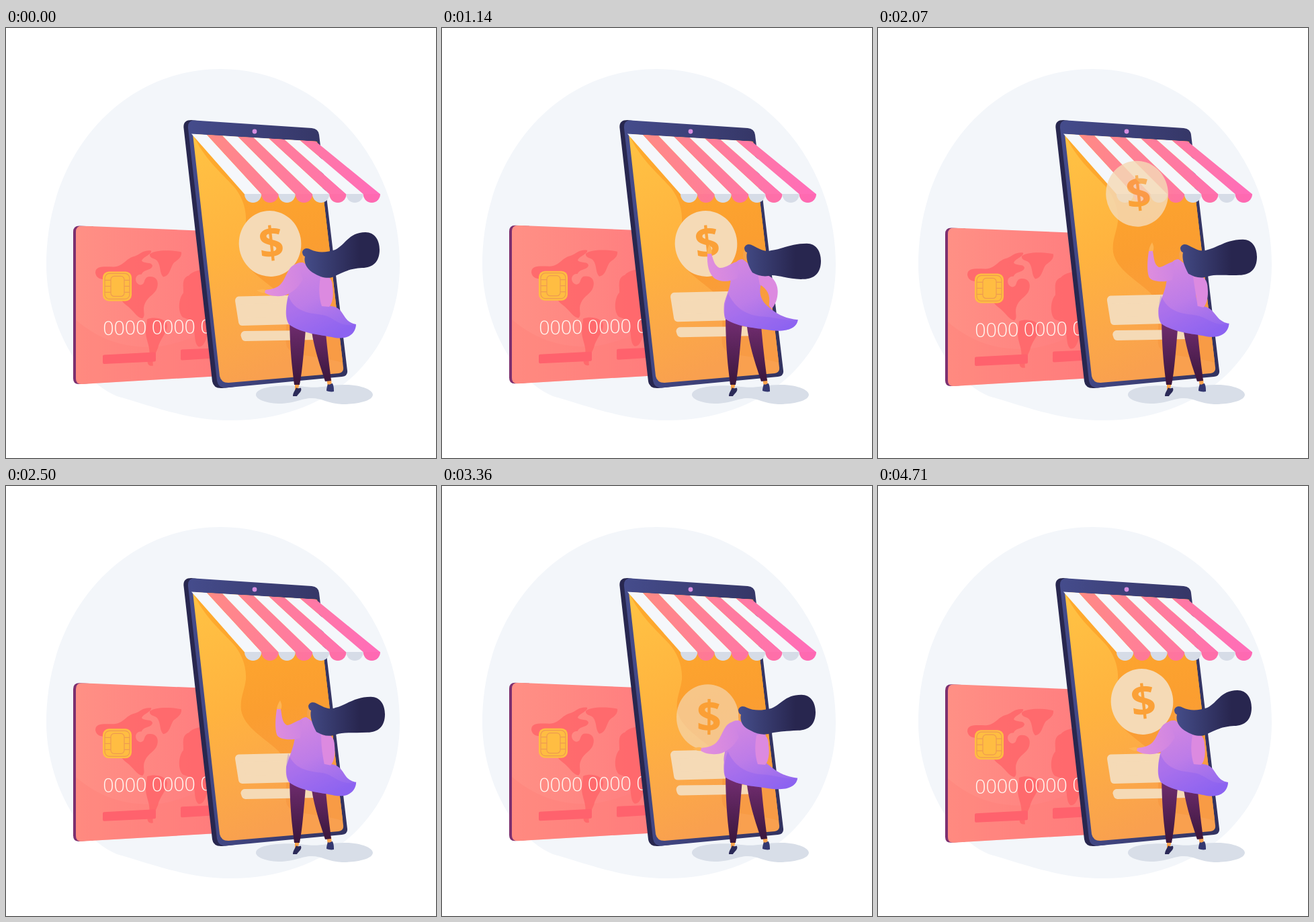
Animation, 640 px wide and 640 px high, one loop 4.78 s. Source, as an HTML page:

```html
<!DOCTYPE html>
<html lang="en">
<head>
<meta charset="utf-8">
<title>Mobile shopping</title>
<style>
  html, body { margin: 0; height: 100%; overflow: hidden; background: #fff; }
  svg { display: block; width: 100vw; height: 100vh; }
  text { font-family: "Open Sans", sans-serif; }
</style>
</head>
<body>
<svg viewBox="0 0 640 640">
  <defs>
    <linearGradient id="cardFill"><stop stop-color="#ff9085"/><stop offset="1" stop-color="#ff7d7f"/></linearGradient>
    <linearGradient id="frameFill"><stop stop-color="#454c8c"/><stop offset="1" stop-color="#32325f"/></linearGradient>
    <linearGradient id="screenFill" x2=".3" y2="1"><stop stop-color="#ffc444"/><stop offset=".5" stop-color="#ffb33f"/><stop offset="1" stop-color="#f9a04f"/></linearGradient>
    <linearGradient id="waveFill" x2=".2" y2="1"><stop stop-color="#ffad2c"/><stop offset=".6" stop-color="#fb9e30"/><stop offset="1" stop-color="#f89b45"/></linearGradient>
    <linearGradient id="stripeFill" gradientUnits="userSpaceOnUse" x1="300" x2="557"><stop stop-color="#ff8a84"/><stop offset="1" stop-color="#ff6cba"/></linearGradient>
    <linearGradient id="hairFill" gradientUnits="userSpaceOnUse" x1="445" x2="535"><stop stop-color="#444c88"/><stop offset=".9" stop-color="#28264f"/></linearGradient>
    <linearGradient id="dressFill" gradientUnits="userSpaceOnUse" x1="435" y1="345" x2="490" y2="460"><stop stop-color="#d588e0"/><stop offset=".5" stop-color="#bd7ce8"/><stop offset="1" stop-color="#9068f0"/></linearGradient>
    <linearGradient id="armFill" gradientUnits="userSpaceOnUse" x1="390" x2="445"><stop stop-color="#e28fdc"/><stop offset="1" stop-color="#cd84e3"/></linearGradient>
    <linearGradient id="legFill" x2="0" y2="1"><stop stop-color="#7a3078"/><stop offset="1" stop-color="#3a173c"/></linearGradient>
    <clipPath id="cardClip"><path d="M104 303Q104 294 113 294L310 302V518L113 529.500Q104 530 104 521Z"/></clipPath>
    <clipPath id="screenClip"><path d="M278 158L463 169 502 505Q503 513 495 514L331 528Q320 528 318 518Z"/></clipPath>
  </defs>

  <path fill="#f3f6fa" d="M320 61C466 61 586 192 586 352C586 490 480 584 335 584C270 584 215 562 165 548C100 520 60 430 60 352C60 186 174 61 320 61Z"/>
  <path fill="#d8dee8" d="M372 546C372 532 420 530 445 534C470 537 480 530 510 531C535 533 546 540 546 546C545 556 520 560 500 560C480 559 470 551 455 551C440 551 430 559 405 559C385 558 372 552 372 546Z"/>

  <g id="card">
    <path fill="#7c3070" d="M100 303Q100 294 109 294L130 295V528L109 529.500Q100 530 100 521Z"/>
    <g clip-path="url(#cardClip)">
      <path fill="url(#cardFill)" d="M104 290H310V532H104Z"/>
      <path fill="#ff7c74" opacity=".3" d="M104 434C140 465 180 477 225 474C260 470 285 455 310 450V532H104Z"/>
      <g fill="#ff666a" opacity=".85">
        <path d="M133 364C133 353 146 355 160 355C176 354 178 342 192 339C201 336 203 330 216 331C218 336 204 340 202 346C206 351 216 347 218 353C217 361 205 358 202 366C190 366 191 380 200 382C208 381 204 373 211 370C223 368 228 376 225 386C222 396 212 398 207 409C202 419 209 427 203 432C194 430 190 420 179 412C166 402 164 386 160 374C150 372 136 378 133 364Z"/>
        <path d="M214 336C222 329 247 330 261 333C262 342 254 345 249 350C244 358 244 368 234 370C228 364 231 354 225 346C222 342 213 343 214 336Z"/>
        <path d="M210 433C222 428 240 433 240 443C239 455 229 462 226 476C222 486 217 493 219 502C213 504 208 499 212 490C217 477 208 465 208 452Z"/>
        <path d="M310 358C290 358 278 361 272 368C260 372 265 386 264 394C256 403 256 423 263 430C272 434 280 434 279 446C282 456 280 470 287 474C298 474 298 455 304 447L310 440Z"/>
      </g>
      <path fill="#ff626d" d="M146 486L221 482Q223 482 223 484V494Q223 496 221 496L146 499.500Q144 499.500 144 497V488Q144 486 146 486ZM262 478L310 476V491L262 494Q260 494 260 492V480Q260 478 262 478Z"/>
      <rect x="144" y="362" width="43" height="44" rx="9" fill="#ffbd42"/>
      <g fill="none" stroke="#ee9b50" stroke-width="1.200">
        <rect x="147" y="365" width="37" height="38" rx="7"/>
        <rect x="156" y="369" width="20" height="30" rx="5"/>
        <path d="M147 375H156M147 384H156M147 393H156M176 375H184M176 384H184M176 393H184"/>
      </g>
      <text x="144.500" y="456.500" font-size="28.500" font-weight="300" fill="#fff6f0" transform="rotate(-1 144 456)">0000 0000 0000</text>
    </g>
  </g>

  <path fill="#28274f" d="M276 137Q263 137 264.500 149L307 526Q309 537 322 536L340 534 300 140Z"/>
  <path fill="url(#frameFill)" d="M281 137.500L455 149Q465 150 466 159L508 510Q509 518 500 519L327 535.500Q316 536 314 525L271 149Q270 137 281 137.500Z"/>
  <circle cx="370" cy="154" r="3.400" fill="#d68de0"/>
  <g clip-path="url(#screenClip)">
    <path fill="url(#screenFill)" d="M270 150H510V535H270Z"/>
    <path fill="url(#waveFill)" d="M278 158C295 195 320 215 340 237C352 252 358 270 357 288C355 305 348 315 350 334C355 360 385 375 405 394C425 415 414 450 417 470C420 492 460 484 510 501V150Z"/>
  </g>
  <g id="bars" fill="#f5dab6" stroke="#f5dab6" stroke-width="12" stroke-linejoin="round">
    <path d="M347 405.500L457 403 462 434 352 437Z"/>
    <path d="M355.500 457L460 456 461 458 356.500 460Z"/>
  </g>
  <g id="awning"></g>
  <g id="coin">
    <g transform="rotate(-6)">
      <ellipse rx="46.300" ry="49" fill="#f5dab6"/>
      <text x="2" y="22" font-size="65" font-weight="700" text-anchor="middle" fill="#fba138">$</text>
    </g>
  </g>

  <path fill="#f9a34b" d="M430 529H437L434 540H430ZM477 522H484L485 533H479Z"/>
  <path fill="#2b2a58" d="M432 535C435 538 438 535 439 536C441 541 435 544 433 548H427C427 543 430 540 432 535Z"/>
  <path fill="#343870" d="M479 530C481 532 484 529 486 529C488 533 488 537 488 541C484 542 480 541 477 540C477 536 478 533 479 530Z"/>
  <path fill="url(#legFill)" d="M452 426L474 430C477 470 481 500 484 525L475 526C467 500 455 470 452 426Z"/>
  <path fill="url(#legFill)" d="M422 422L448 426C444 470 442 505 437 531H429C425 500 422 470 422 422Z"/>
  <ellipse id="face" rx="4.500" ry="9" fill="#f4a24c"/>
  <path id="dress" fill="url(#dressFill)"/>
  <path id="fold" fill="#8257f2" opacity=".3"/>
  <path id="sideArm" fill="#dc8ae0"/>
  <path id="hand" fill="#fdb453"/>
  <path id="arm" fill="url(#armFill)"/>
  <path id="hair" fill="url(#hairFill)"/>
</svg>
<script>
const LOOP = 4780, STEPS = 67, SWAY = LOOP / 2;
const $ = id => document.getElementById(id);
const set = (id, name, value) => $(id).setAttribute(name, value);

const ease = (t, a, b) => {
  const x = Math.min(1, Math.max(0, (t - a) / (b - a)));
  return (1 - Math.cos(Math.PI * x)) / 2;
};

// Blend two paths that share the same commands.
const mix = (from, to, k) => {
  const number = /-?[\d.]+/g, ends = to.match(number);
  let i = 0;
  return from.replace(number, v => (+v + (ends[i++] - v) * k).toFixed(2));
};

const arms = {
  rest: "M434 351 C418 353 418 374 407 383 C401 388 393 389 386 390 L385 394 C394 400 410 401 420 396 C430 391 436 384 442 374 Z",
  tap: "M442 347 C431 349 422 358 413 357 C406 354 404 346 401 336 L395 336 C394 352 397 366 406 373 C416 379 428 378 440 372 Z",
  press: "M442 347 C432 349 424 356 418 356 C411 352 411 344 409 332 L403 332 C401 345 400 360 403 370 C406 378 425 379 438 375 Z"
};
const hands = {
  rest: "M387 390 C382 387 378 390 373 390 C377 393 381 395 386 394 Z",
  tap: "M401 337 C403 328 399 325 398 322 C396 326 394 331 395 337 Z",
  press: "M409 333 C412 326 409 322 408 319 C405 324 403 328 403 333 Z"
};
const torso = [
  "M442 349 C430 348 424 356 424 370 C424 390 418 402 ",
  "M447 344 C436 345 432 356 430 372 C429 388 423 398 "
];
const skirt = [
  "417 418 C416 430 418 436 421 441 C440 455 470 457 485 460 C505 465 520 458 521 441 C500 438 505 416 484 414 C470 410 ",
  "420 410 C419 422 420 430 422 433 C442 446 470 446 485 449 C510 453 528 448 530 434 C510 432 498 426 486 415 C471 403 "
];
const shoulder = [
  "480 390 482 370 C470 365 452 355 442 349 Z",
  "470 388 480 368 C472 364 456 350 447 344 Z"
];
const fold = [
  "M420 398 C430 425 455 424 470 427 C490 430 495 447 521 441 C520 458 505 465 485 460 C470 457 440 455 421 441 C416 430 416 412 420 398 Z",
  "M426 395 C440 425 465 430 485 430 C505 433 515 436 530 434 C528 448 510 453 485 449 C470 446 442 446 422 433 C419 422 421 408 426 395 Z"
];
const sideArm = [
  "M468 371 C478 366 486 372 486 385 C488 398 486 410 481 415 L470 414 C466 402 465 388 468 371 Z",
  "M470 366 C490 364 500 378 500 392 C500 404 496 412 491 418 L487 413 C490 397 484 388 473 382 Z"
];

const hairPath = (pose, sway) => {
  const x = 441 + 9 * pose, y = 333 - 6 * pose;
  const tx = 8 * pose, ty = 9.5 * pose + 7.5 * sway;
  const at = (px, py) => `${px + tx} ${py + ty}`;
  return `M${x} ${y} C${x + 2} ${y - 6} ${x + 8} ${y - 6} ${x + 13} ${y - 3}
    C${x + 23} ${y + 2} ${478 + 3 * pose} 334 490 ${330 + sway}
    C505 ${323 + ty * .4} ${at(510, 304)} ${at(535, 304)}
    C${at(549, 304)} ${at(556, 316)} ${at(556, 330)}
    C${at(556, 348)} ${at(546, 357)} ${at(530, 357)}
    C${at(512, 358)} 502 ${363 + ty * .3} ${488 + 3 * pose} ${370 - 2 * sway}
    C480 ${374 - 3 * sway} ${468 + 3 * pose} ${371 - 2 * sway} ${460 + 2 * pose} ${366 - 2 * sway}
    C${x + 5} ${y + 26} ${x + 2} ${y + 15} ${x + 4} ${y + 7}
    C${x + 2} ${y + 7} ${x} ${y + 4} ${x} ${y} Z`;
};

function buildAwning() {
  let shapes = "";
  for (let i = 0; i < 8; i++) {
    const top = k => `${276 + 23.1 * k} ${157.5 + 1.4 * k}`, low = k => 355 + 25.25 * k;
    const pink = i % 2, fill = pink ? "url(#stripeFill)" : "#f5f7fb";
    const cup = `M${low(i)} 247A12.6 13 0 0 0 ${low(i + 1)} 247Z`;
    shapes += `<path fill="${fill}" d="M${top(i)}L${top(i + 1)}L${low(i + 1)} 247.300H${low(i)}Z"/>
      <path fill="${pink ? fill : "#d6dce7"}" d="${cup}"/>`;
    if (pink) shapes += `<path fill="#f4508f" opacity=".12" d="${cup}"/>`;
  }
  $("awning").innerHTML = shapes;
}

function draw(t) {
  const angle = 2 * Math.PI * t / SWAY;
  const sway = (1 - Math.cos(angle)) / 2;
  const pose = ease(t, 80, 570) - ease(t, 2780, 3300);
  const press = ease(t, 1150, 1700);

  set("card", "transform", `translate(0 ${.7 - 3.9 * Math.cos(angle - 1.5)})`);
  set("bars", "transform", `translate(${-sway} ${-6 * sway})`);

  const entering = t > 2900, arrive = ease(t, 3000, 3590);
  const shift = entering
    ? 80 - 87 * arrive + 7 * ease(t, 3590, 3950)
    : 13 * ease(t, 1100, 1710) - 123 * ease(t, 1750, 2250);
  const tilt = entering ? 18 * (1 - arrive) : 0;
  set("coin", "transform", `translate(${393 + .1 * shift} ${321 + shift}) rotate(${tilt})`);
  set("coin", "opacity", 1 - ease(t, 2000, 2250) + ease(t, 3100, 3520));

  const reach = p => mix(p.rest, mix(p.tap, p.press, press), pose);
  set("arm", "d", reach(arms));
  set("hand", "d", reach(hands));
  set("sideArm", "d", mix(...sideArm, pose * (.2 + .8 * sway)));
  set("dress", "d", mix(...torso, pose) + mix(...skirt, sway) + mix(...shoulder, pose));
  set("fold", "d", mix(...fold, sway));
  set("hair", "d", hairPath(pose, sway));
  set("face", "cx", 445.5 + 7 * pose);
  set("face", "cy", 342 - 4 * pose);
}

function tick() {
  const step = LOOP / STEPS;
  draw(Math.floor(performance.now() % LOOP / step) * step);
  requestAnimationFrame(tick);
}

buildAwning();
tick();
</script>
</body>
</html>
```
